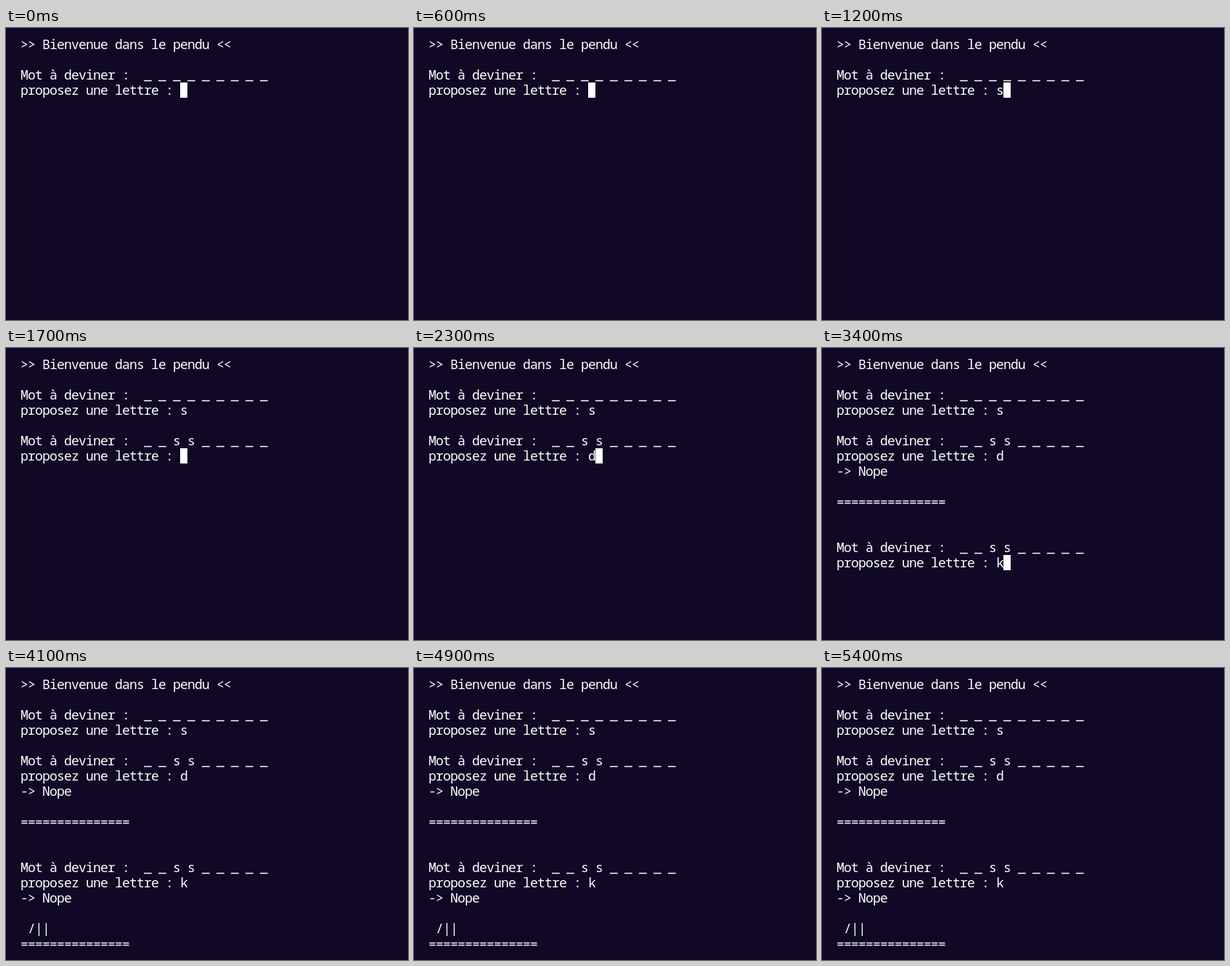
Animation, 554 px wide and 402 px high, one loop 5500 ms. Source, as an HTML page:

```html
<!DOCTYPE html>
<html lang="fr">
<head>
<meta charset="utf-8">
<title>Le pendu</title>
<style>
  html, body {
    margin: 0;
    width: 100%;
    height: 100%;
    overflow: hidden;
    background: #100824;
  }
  .term {
    --row: 21px;
    --col: 10px;
    position: absolute;
    left: 20px;
    top: 12px;
    color: #fff;
    font: 18px/21px "Noto Sans Mono", "DejaVu Sans Mono", monospace;
    letter-spacing: -0.8px;
    font-variant-ligatures: none;
  }
  pre {
    position: absolute;
    left: calc(var(--x, 0) * var(--col));
    top: calc(var(--y, 0) * var(--row));
    margin: 0;
    font: inherit;
  }
  .cursor {
    position: absolute;
    width: 10px;
    height: 21px;
    background: #fff;
    animation: move 5.5s step-end infinite;
  }
  .key { --x: 22; }
  .step { animation: 5.5s step-end infinite; }
  .s { animation-name: s; }
  .round2 { animation-name: round2; }
  .d { animation-name: d; }
  .round3 { animation-name: round3; }
  .k { animation-name: k; }
  .miss { animation-name: miss; }

  /* Each step stays visible from its moment until the loop restarts */
  @keyframes s      { 0% { visibility: hidden } 18.18%, 100% { visibility: visible } }
  @keyframes round2 { 0% { visibility: hidden } 27.27%, 100% { visibility: visible } }
  @keyframes d      { 0% { visibility: hidden } 38.18%, 100% { visibility: visible } }
  @keyframes round3 { 0% { visibility: hidden } 49.09%, 100% { visibility: visible } }
  @keyframes k      { 0% { visibility: hidden } 60%, 100% { visibility: visible } }
  @keyframes miss   { 0% { visibility: hidden } 70.9%, 100% { visibility: visible } }

  @keyframes move {
    0%     { transform: translate(220px, 63px) }
    18.18% { transform: translate(230px, 63px) }
    27.27% { transform: translate(220px, 126px) }
    38.18% { transform: translate(230px, 126px) }
    49.09% { transform: translate(220px, 273px) }
    60%    { transform: translate(230px, 273px); visibility: visible }
    70.9%, 100% { transform: translate(230px, 273px); visibility: hidden }
  }
</style>
</head>
<body>
<div class="term">
<pre>&gt;&gt; Bienvenue dans le pendu &lt;&lt;

Mot à deviner :  _ _ _ _ _ _ _ _ _
proposez une lettre :</pre>
<pre class="step key s" style="--y: 3">s</pre>
<pre class="step round2" style="--y: 5">Mot à deviner :  _ _ s s _ _ _ _ _
proposez une lettre :</pre>
<pre class="step key d" style="--y: 6">d</pre>
<pre class="step round3" style="--y: 7">-&gt; Nope

===============


Mot à deviner :  _ _ s s _ _ _ _ _
proposez une lettre :</pre>
<pre class="step key k" style="--y: 13">k</pre>
<pre class="step miss" style="--y: 14">-&gt; Nope

 /||
===============</pre>
<div class="cursor"></div>
</div>
</body>
</html>
```
